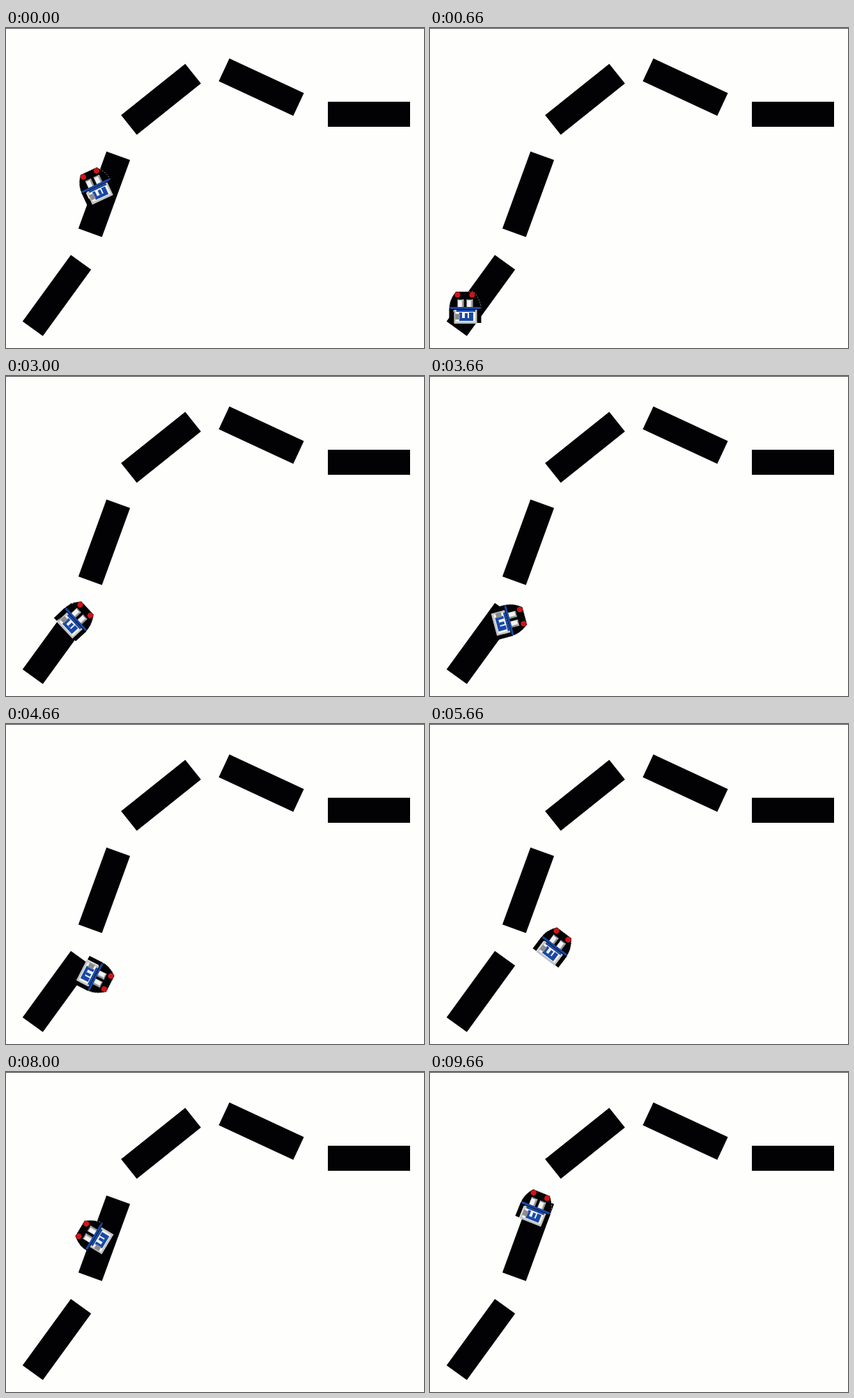
An HTML page with a canvas for the animation above (10 s loop, 600x460 px).

```html
<!DOCTYPE html>
<html lang="en">
<head>
<meta charset="utf-8">
<title>Line follower</title>
<style>
html, body { margin: 0; width: 100%; height: 100%; overflow: hidden; background: #fefefd; }
canvas { display: block; }
</style>
</head>
<body>
<canvas id="stage" width="600" height="460"></canvas>
<script>
const ctx = document.getElementById('stage').getContext('2d');
const LOOP = 10000;
const STEPS = 30;
const LAST_POSE = 26;   // the loop opens on this step's pose
const AXLE = 15;        // distance from the axle to the robot's centre
const PAPER = '#fefefd', BLACK = '#020204', BLUE = '#1648a8', RED = '#d01418';

// centre x, centre y, angle
const tracks = [
  [73, 384.5, -54], [141, 239, -70], [222.5, 102.5, -38.7], [366.5, 85, 25], [521, 124, 0]
];

// moments where the steering changes: step, axle x, axle y, heading (clockwise from up)
const turns = [
  [4, 50, 418, 0],
  [9, 88.5, 360, 47],
  [14, 115, 356, 117],
  [20, 182, 275.5, -43],
  [24, 139.5, 245, -59],
  [LAST_POSE, 135, 241, -25],
  [29, 145.5, 209.5, 22]
];

const rad = deg => deg * Math.PI / 180;
const ahead = (deg, dist) => [Math.sin(rad(deg)) * dist, -Math.cos(rad(deg)) * dist];

function hermite(p, v, q, w, u) {
  const s = u * u * (3 - 2 * u), k = 1 - u;
  return p + (q - p) * s + v * u * k * k - w * u * u * k;
}

// between two turns the axle rolls along its heading
function poseAt(step) {
  if (step === 0) step = LAST_POSE;
  let i = 0;
  while (i < turns.length - 2 && turns[i + 1][0] <= step) i++;
  const [s0, x0, y0, h0] = turns[i], [s1, x1, y1, h1] = turns[i + 1];
  const u = Math.max(0, (step - s0) / (s1 - s0));
  const heading = h0 + (h1 - h0) * u;
  const dist = Math.hypot(x1 - x0, y1 - y0);
  const v = ahead(h0, dist), w = ahead(h1, dist), nose = ahead(heading, AXLE);
  return {
    x: hermite(x0, v[0], x1, w[0], u) + nose[0],
    y: hermite(y0, v[1], y1, w[1], u) + nose[1],
    heading
  };
}

function stepAt(ms) {
  return Math.floor((Math.floor(ms / 10) + 0.7) * 10 * STEPS / LOOP);
}

function placed(x, y, deg, paint) {
  ctx.save();
  ctx.translate(x, y);
  ctx.rotate(rad(deg));
  paint();
  ctx.restore();
}

function box(color, x, y, w, h) {
  ctx.fillStyle = color;
  ctx.fillRect(x, y, w, h);
}

function dot(color, x, y, r) {
  ctx.beginPath();
  ctx.arc(x, y, r, 0, Math.PI * 2);
  ctx.fillStyle = color;
  ctx.fill();
}

function hull() {
  ctx.beginPath();
  ctx.moveTo(-22, 3);
  ctx.quadraticCurveTo(-24, -10, -13, -24);
  ctx.lineTo(13, -24);
  ctx.quadraticCurveTo(24, -10, 23, 3);
  ctx.closePath();
  ctx.fillStyle = BLACK;
  ctx.fill();
  ctx.strokeStyle = '#c8c8c8';
  ctx.lineWidth = 0.7;
  ctx.setLineDash([2, 2]);
  ctx.stroke();
}

function sensor(x) {
  box('#d0d0d0', x, -13, 9, 12);
  box('#f4f4f4', x + 1, -11, 5, 9);
  box('#8c8c8c', x + 7, -11, 2, 10);
  box('#606060', x + 1, -13, 7, 1);
}

function robot() {
  hull();
  for (const side of [-1, 1]) {
    box(BLACK, side * 20 - 2.5, 0, 6, 21);
    dot(RED, side * 10.5, -19.5, 4);
    sensor(side * 6.5 - 4);
  }
  box(BLUE, -21, -2, 43, 3);
  box('#c4c4c4', -15.5, 2, 33, 20);
  box('#f2f2f2', -13, 5, 28, 14);
  box(BLUE, -12, 2, 27, 3);
  box(BLUE, -8, 6, 20, 12);
  box('#f0f0f0', -4, 5, 10, 9);
  box(BLUE, 0, 7, 4, 7);
  box('#8c8c8c', -14, 8, 7, 8);
}

function draw(ms) {
  box(PAPER, 0, 0, 600, 460);
  box('#484848', 0, 0, 600, 1);
  for (const [x, y, deg] of tracks) placed(x, y, deg, () => box(BLACK, -59, -18, 118, 36));
  const { x, y, heading } = poseAt(stepAt(ms));
  placed(x, y, heading, robot);
}

const start = performance.now();
function tick() {
  draw((performance.now() - start) % LOOP);
  requestAnimationFrame(tick);
}
tick();
</script>
</body>
</html>
```
